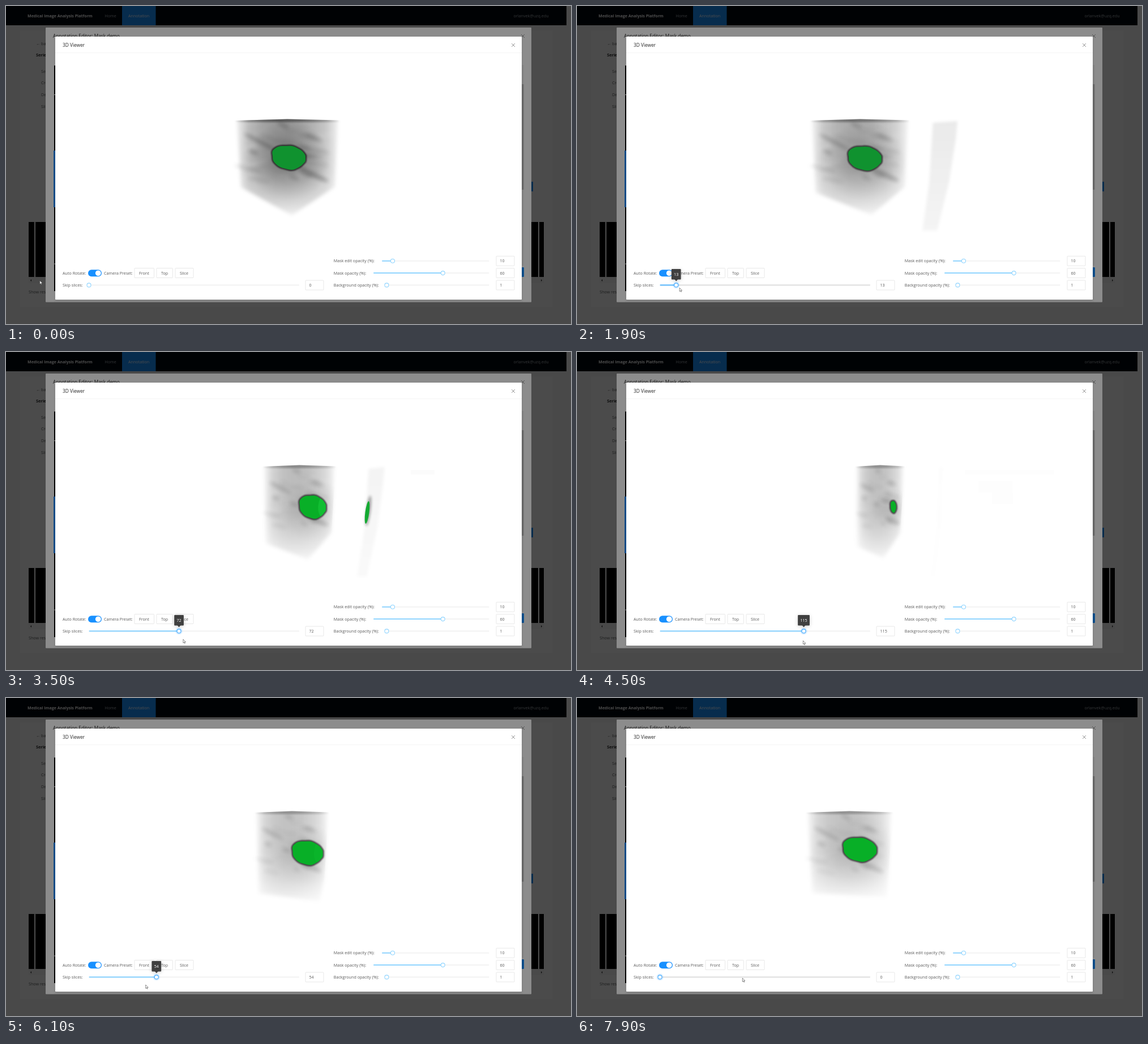
An HTML page with a canvas that plays this animation: 998x561 px, repeating every 8000 ms.

```html
<!DOCTYPE html>
<html lang="en">
<head>
<meta charset="utf-8">
<title>3D Viewer</title>
<style>
html, body { margin: 0; width: 100%; height: 100%; overflow: hidden; background: #494949; }
svg, canvas { position: absolute; left: 0; top: 0; }
text { font: 7.17px 'Open Sans', sans-serif; fill: #595959; white-space: pre; }
.b { font-weight: 700; fill: #262626; font-size: 7.3px; }
.title { font-weight: 500; font-size: 8.3px; fill: #262626; }
.box { fill: #fff; stroke: #d9d9d9; stroke-width: .6; }
.rail { fill: #f3f3f3; }
.track { fill: #91d5ff; }
.knob { fill: #fff; stroke: #91d5ff; stroke-width: 1.1; }
.x { fill: none; stroke: #7c7c7c; stroke-width: .8; }
#tip { filter: drop-shadow(0 1px 3px #0003); }
#tip text { fill: #fff; text-anchor: middle; }
</style>
</head>
<body>
<svg width="998" height="561">
  <!-- page -->
  <rect width="998" height="561" fill="#f0f2f2"/>
  <rect x="25" y="43" width="940" height="488" fill="#f8f9f9"/>
  <rect width="990" height="34" fill="#00060c"/>
  <rect x="205" width="59.5" height="34" fill="#1890ff"/>
  <text x="38" y="20" class="b" style="font-size:7.06px;fill:#fff">Medical Image Analysis Platform</text>
  <text x="174.5" y="20" style="fill:#a6adb4">Home</text>
  <text x="216" y="20" style="fill:#fff">Annotation</text>
  <text x="896.5" y="20" style="fill:#a6adb4">orlanvek@uzq.edu</text>
  <text x="53" y="69">← back</text>
  <text x="53" y="89" class="b">Series</text>
  <g id="labels"></g>
  <rect x="40" y="381" width="910" height="97"/>
  <path d="M51 381v97M941 381v97" stroke="#fff" stroke-width="2"/>
  <rect x="40" y="478" width="910" height="11" fill="#f1f1f1"/>
  <path d="M45 482v4l-2-2zM945 482v4l2-2z" fill="#333"/>
  <text x="40" y="506.5">Show results</text>
  <rect x="890" y="310" width="41" height="17" fill="#1890ff"/>
  <text x="428" y="565.5">Medical Image Analysis Platform</text>
  <rect width="998" height="561" opacity=".45"/>

  <!-- outer dialog -->
  <rect x="70" y="38" width="858" height="484.5" rx="1" fill="#fff"/>
  <text x="83" y="56" class="title">Annotation Editor: Mask demo</text>
  <path d="M910 50l6 6m0-6l-6 6" class="x"/>
  <rect x="85" y="105" width="12" height="398"/>
  <path d="M85 156.5h4M85 455h4" stroke="#fff"/>
  <rect x="84" y="255" width="10" height="100" fill="#1890ff"/>
  <rect x="908" y="104" width="6.5" height="354" fill="#f1f1f1"/>
  <rect x="908" y="138" width="6.5" height="186" fill="#c1c1c1"/>
  <rect x="890" y="461" width="25" height="17" rx="1" fill="#1890ff"/>
  <rect width="998" height="561" opacity=".45"/>

  <!-- viewer dialog -->
  <rect x="87" y="54" width="824" height="464" rx="1" fill="#fff" style="filter:drop-shadow(0 2px 2px #0002)"/>
  <text x="100" y="72" class="title">3D Viewer</text>
  <path d="M87 82.5h824" stroke="#f0f0f0" stroke-width=".7"/>
  <path d="M893 66l6 6m0-6l-6 6" class="x"/>
  <text x="100" y="474">Auto Rotate:</text>
  <rect x="145" y="465.3" width="24" height="12" rx="6" fill="#1890ff"/>
  <circle cx="162.8" cy="471.3" r="4.9" fill="#fff"/>
  <text x="173" y="474">Camera Preset:</text>
  <g id="boxes"></g>
  <text x="100" y="495">Skip slices:</text>
  <rect id="rail" class="rail" x="146.5" y="491.3" width="371.5" height="2.1" rx="1"/>
  <rect id="track" class="track" x="146.5" y="491.3" height="2.1" rx="1"/>
  <text id="value" x="535.5" y="495.3"></text>
  <g id="tip">
    <rect id="tipBox" y="464" height="18.5" rx="1" fill="#404040"/>
    <path d="M-3 482h6l-3 3.5z" fill="#404040"/>
    <text y="476.2"></text>
  </g>
  <g id="knob">
    <circle id="halo" cy="492.4" r="6.3" fill="#1890ff" opacity=".13"/>
    <circle class="knob" cy="492.4" r="3.5"/>
  </g>
  <path id="cursor" fill="#fff" stroke="#333" stroke-width=".55"/>
</svg>
<canvas id="view" width="998" height="561"></canvas>
<script>
const $ = id => document.getElementById(id);
const ctx = $('view').getContext('2d');
const ARROW = 'M0 0V6.4L1.5 5L2.5 7.2L3.5 6.8L2.5 4.6H4.5Z';
const HAND = 'M1.5 4V.6a.6.6 0 0 1 1.2 0V3l2.6.7q.6.2.5 1L5.3 7.5H2.4L.3 4.8q.4-.9 1.2-.2Z';

// static labels, boxes and sliders
const box = (x, y, w, label, pad) =>
  `<rect class="box" x="${x}" y="${y}" width="${w}" height="17" rx="1"/><text x="${x + pad}" y="${y + 11}">${label}</text>`;
const slider = (label, y, x, pct) => {
  const w = 853.5 - x, k = x + w * pct / 100;
  return `<text x="578.8" y="${y + 2.6}">${label} (%):</text>
    <rect class="rail" x="${x}" y="${y - 1.1}" width="${w}" height="2.1" rx="1"/>
    <rect class="track" x="${x}" y="${y - 1.1}" width="${k - x}" height="2.1" rx="1"/>
    <circle class="knob" cx="${k}" cy="${y}" r="3.5"/>` + box(866, y - 8.5, 32, pct, 6.5);
};
$('labels').innerHTML = ['Series:', 'Created:', 'Description:', 'Slices:']
  .map((s, i) => `<text x="62" y="${117.5 + i * 20.8}">${s}</text>`).join('');
$('boxes').innerHTML = box(227, 462.5, 34.5, 'Front', 8) + box(266, 462.5, 28.5, 'Top', 8) +
  box(299, 462.5, 32, 'Slice', 8) + box(529, 484, 32, '', 0) +
  slider('Mask edit opacity', 449.8, 664, 10) + slider('Mask opacity', 471.1, 649, 60) +
  slider('Background opacity', 492.4, 670.6, 1);

const clamp = v => Math.max(0, Math.min(1, v));
const bump = (v, mid, width) => Math.exp(-(((v - mid) / width) ** 2));
const black = a => `rgba(0,0,0,${a})`;

// skipped slices over seconds: drag out, hold, drag back
const drag = [[0, 0], [1.2, 0], [1.9, 13], [2.6, 38], [3.5, 72], [4.5, 115], [5.3, 115], [6.1, 54], [6.7, 0], [9, 0]];
function skipAt(t) {
  const i = drag.findIndex(k => k[0] > t), [t0, a] = drag[i - 1], [t1, b] = drag[i];
  return a + (b - a) * (t - t0) / (t1 - t0);
}
const knobX = skip => 146.5 + skip * 2.209;

function cursorAt(t) {
  const u = t / 1.2;
  if (u < 1) return [62 + 86 * u * u - 70 * u * (1 - u), 488 + 9 * u + 50 * u * (1 - u)];
  const out = clamp(t - 6.9);
  return [knobX(skipAt(t + .09)) + 1 + 147 * out * out * (3 - 2 * out), 497 + 16 * Math.sin(Math.PI * (t - 1.4) / 6.6)];
}

let seed = 7;
const rnd = () => (seed = seed * 16807 % 2147483647) / 2147483647;
const streaks = Array.from({ length: 44 }, () =>
  ({ u: .08 + rnd() * .76, v: .03 + rnd() * .65, size: .05 + rnd() * .12, tone: rnd() - .4 }));

function path(points) {
  ctx.beginPath();
  points.forEach(p => ctx.lineTo(...p));
  ctx.closePath();
}
function oval(x, y, rx, ry, fill, tilt = 0) {
  ctx.beginPath();
  ctx.ellipse(x, y, rx, ry, tilt, 0, 7);
  ctx.fillStyle = fill;
  ctx.fill();
}
function gradient(x0, y0, x1, y1, alpha) {
  const g = ctx.createLinearGradient(x0, y0, x1, y1);
  for (let u = 0; u <= 1; u += .125) g.addColorStop(u, black(alpha(u)));
  return g;
}

// the cut eats the volume from the left while it slowly turns
function drawVolume(t, s, m) {
  const l = 406 + .55 * s + .0018 * s * s, r = 588 - t * t / 2, w = r - l;
  const by = 370 - .28 * t * t, density = .6 + .4 * bump(t, 0, 2.5);
  const body = [[r - 7, 319], [Math.min(505 + 8 * t, r - 10), by], [l + 9 * (1 - s / 115), Math.min(320 + 5 * t, 345)]];
  const across = k => gradient(l, 0, r, 0, u => k * density * (.04 + .38 * Math.sin(Math.PI * u) ** .6 * (1.12 - .35 * u)));
  ctx.save();
  path([[l - 9, 202], [l, 202], [l + w / 2, 199.5], [r, 201.5], [r + 9, 202], [r + 9, 400], [l - 9, 400]]);
  ctx.clip();
  ctx.filter = 'blur(3px)';
  path([[l + 1, 190], [r - 1, 190], ...body]);
  ctx.fillStyle = across(1);
  ctx.fill();
  ctx.filter = 'blur(1.5px)';
  ctx.fillStyle = across(1);
  ctx.fillRect(l, 196, w, 9);
  ctx.filter = 'blur(3.5px)';
  for (const { u, v, size, tone } of streaks) {
    ctx.globalCompositeOperation = tone > 0 ? 'source-over' : 'destination-out';
    oval(l + u * w, 202 + v * 160, size * w, 3.5, black(Math.abs(tone) * .4 * density), tone * .8);
  }
  ctx.filter = 'none';
  ctx.globalCompositeOperation = 'source-over';
  const shade = ctx.createRadialGradient(m.x, m.y + 6, 5, m.x, m.y + 6, Math.min(72, w * .45));
  shade.addColorStop(0, black(.25 * density ** 2));
  shade.addColorStop(1, black(0));
  path([[l, 201], [r, 201], ...body]);
  ctx.fillStyle = shade;
  ctx.fill();
  ctx.globalCompositeOperation = 'destination-in';
  ctx.fillStyle = gradient(0, 200, 0, by, u => 1 - .87 * clamp((u - .45) / .55) ** 1.4);
  ctx.fillRect(0, 0, 998, 561);
  ctx.restore();
}

// the skipped slices, floating to the right
function drawSlab(t, s) {
  const open = clamp(1 - t / 5.3), x = Math.min(626 + .2 * s, 641), w = 4 + 40 * (1 - (s / 115) ** 2);
  const foot = 608 + .17 * s, bend = (x + foot) / 2 + 3;
  ctx.save();
  ctx.filter = 'blur(2.5px)';
  path([[x, 206], [x + w, 203], [x + w - 3, 235], [bend + w * .8, 310], [foot + w * .6, 396], [foot, 396], [bend, 310]]);
  ctx.fillStyle = gradient(0, 200, 0, 400, u => .13 * open * clamp(s / 13) * (1 - .5 * u));
  ctx.fill();
  const green = clamp(3 * open) * bump(s, 72, 12);
  oval(640, 280, 3.5, 27, black(.4 * green), .13);
  ctx.filter = 'blur(.5px)';
  oval(638, 283, 3.5, 20, `rgba(20,170,50,${green})`, .13);
  ctx.filter = 'none';
  ctx.fillStyle = black(.014 * clamp(3 * open));
  for (let i = 0; i < (s - 70) / 15; i++) {
    const span = (42 + 2.7 * (s - 72)) / (i * 1.6 + 1);
    ctx.fillRect(715 - .7 * (s - 72) + i * 24, 208 + i * 20, span, i ? 20 : 8);
  }
  ctx.restore();
}

const maskAt = s => ({
  x: 499.5 + .7 * s - .0016 * s * s, y: 267 + Math.min(6, .11 * s),
  rx: 31 * (1 - (s / 122) ** 3), ry: 21.5 - 11 * (s / 115) ** 6
});

function drawMask(t, s, { x, y, rx, ry }) {
  const points = Array.from({ length: 48 }, (_, i) => {
    const a = i * Math.PI / 24, k = .97 + .03 * Math.cos(3 * a + 1) + .025 * Math.cos(5 * a) + .012 * Math.cos(9 * a);
    const u = Math.min(k * Math.cos(a), .95);
    return [x + rx * u, y + ry * (k * Math.sin(a) + .12 * u)];
  });
  const light = clamp((t - 1.9) / .7);
  ctx.save();
  path(points);
  ctx.lineJoin = 'round';
  ctx.filter = 'blur(1.2px)';
  ctx.strokeStyle = black(.65);
  ctx.lineWidth = 4.5;
  ctx.stroke();
  ctx.filter = 'none';
  ctx.fillStyle = `rgb(${16 - 8 * light},${146 + 29 * light},${47 - 8 * light})`;
  ctx.fill();
  ctx.clip();
  oval(x + rx * .7, y - 1, rx * .3, ry * .87, `rgba(17,190,50,${bump(s, 72, 16)})`, .08);
  ctx.restore();
}

function drawControls(t, s) {
  const skip = Math.round(s), x = knobX(skip), [mx, my] = cursorAt(t);
  const near = my < 502, hover = near && mx > 140, focus = t >= 1;
  $('rail').style.fill = hover ? '#e1e1e1' : '';
  $('track').style.fill = hover ? '#69c0ff' : '';
  $('track').setAttribute('width', x - 146.5);
  $('value').textContent = skip;
  $('knob').setAttribute('transform', `translate(${x})`);
  $('knob').lastElementChild.style.stroke = focus ? '#40a9ff' : '';
  $('halo').style.display = focus ? '' : 'none';
  const tip = $('tip'), w = 8.5 + 4.1 * String(skip).length;
  tip.style.display = focus && t < 7.1 ? '' : 'none';
  tip.setAttribute('transform', `translate(${x})`);
  tip.lastElementChild.textContent = skip;
  $('tipBox').setAttribute('x', -w / 2);
  $('tipBox').setAttribute('width', w);
  $('cursor').setAttribute('d', near && Math.abs(mx - x) < 8 ? HAND : ARROW);
  $('cursor').setAttribute('transform', `translate(${mx - 2.2} ${my - 3.6})`);
}

function frame(now) {
  const t = Math.floor(now % 8000 / 100) / 10, s = skipAt(t), m = maskAt(s);
  ctx.clearRect(0, 0, 998, 561);
  drawVolume(t, s, m);
  drawSlab(t, s);
  drawMask(t, s, m);
  drawControls(t, s);
  requestAnimationFrame(frame);
}
frame(0);
</script>
</body>
</html>
```
